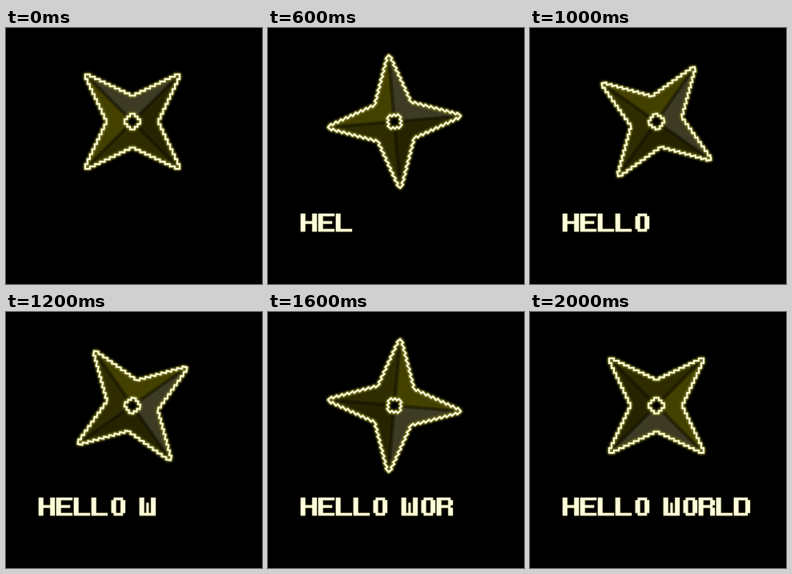
These frames come from a looping animation (320 px wide and 320 px high, 2.2 s). An HTML page with a canvas:

```html
<!DOCTYPE html>
<html lang="en">
<head>
<meta charset="utf-8">
<title>Hello world</title>
<style>
  html, body { margin: 0; height: 100%; overflow: hidden; background: #000; }
  canvas { display: block; }
</style>
</head>
<body>
<canvas id="stage" width="320" height="320" role="img" aria-label="HELLO WORLD"></canvas>
<script>
const ctx = document.getElementById('stage').getContext('2d');
const STEP = 200, STEPS = 11;
const MESSAGE = 'HELLO WORLD';
const CREAM = '#ffffdc', GLOW = '#7c7a2c';
const CELL = 2.95;
const FACETS = ['#3d3b24', '#262400', '#2e2c00', '#434000'];  // top, right, bottom, left

// Repeats one side of a shape in all four directions.
function fourSided(side) {
  const path = new Path2D();
  for (let turn = 0; turn < 4; turn++) {
    side.forEach(([x, y], i) => turn || i ? path.lineTo(x, y) : path.moveTo(x, y));
    side = side.map(([x, y]) => [-y, x]);
  }
  path.closePath();
  return path;
}

// A staircase from the blunt tip down to the notch, then its mirror image.
function starSide() {
  const half = [[-20, -20]];
  for (let i = 0; i < 9; i++) {
    const x = -18 + 2.1 * i;
    half.push([x, -20 + i], [x, -19 + i]);
  }
  return half.concat(half.map(([x, y]) => [-x, y]).reverse());
}

const star = fourSided(starSide());
const hole = fourSided([[-1, -3.3], [1, -3.3], [1, -2.2], [2.2, -2.2], [2.2, -1]]);

function outline(path) {
  ctx.strokeStyle = GLOW;
  ctx.lineWidth = 1.3;
  ctx.stroke(path);
  ctx.strokeStyle = CREAM;
  ctx.lineWidth = 0.7;
  ctx.stroke(path);
}

function drawStar(degrees) {
  ctx.save();
  ctx.translate(158, 117);
  ctx.rotate(degrees * Math.PI / 180);
  ctx.scale(CELL, CELL);
  ctx.lineJoin = 'round';

  ctx.save();
  ctx.clip(star);
  for (const color of FACETS) {
    ctx.fillStyle = color;
    ctx.beginPath();
    ctx.moveTo(0, 0);
    ctx.lineTo(-21, -21);
    ctx.lineTo(21, -21);
    ctx.fill();
    ctx.rotate(Math.PI / 2);
  }
  ctx.strokeStyle = 'rgba(15, 14, 0, 0.45)';
  ctx.lineWidth = 1.6;
  ctx.beginPath();
  for (const side of [-1, 1]) {
    ctx.moveTo(-20, -20 * side);
    ctx.lineTo(20, 20 * side);
  }
  ctx.stroke();
  ctx.restore();

  ctx.fillStyle = '#000';
  ctx.fill(hole);
  ctx.shadowColor = GLOW;
  ctx.shadowBlur = 3;
  outline(star);
  outline(hole);
  ctx.restore();
}

// Builds a letter from stems and bars on a grid of seven by seven cells.
function drawLetter(letter, x) {
  const isOneOf = letters => letters.includes(letter);
  const w = 2.9, h = 3.2, top = 232;
  const stem = (col, from, to, width = 2) =>
    ctx.rect(x + col * w, top + from * h, width * w, (to - from) * h);
  const barEnd = isOneOf('ORD') ? 6 : 7;
  const bar = (row, end = barEnd) => ctx.rect(x + 2 * w, top + row * h, (end - 2) * w, h);

  ctx.beginPath();
  if (isOneOf('O')) stem(1, 1, 6);
  else stem(0, 0, 7);
  if (isOneOf('HW')) stem(5, 0, 7);
  if (isOneOf('OD')) stem(5, 1, 6);
  if (isOneOf('R')) {
    stem(5, 1, 3);
    stem(5, 4, 7);
  }
  if (isOneOf('W')) stem(3, 2, 6, 1);
  if (isOneOf('EORD')) bar(0);
  if (isOneOf('HER')) bar(3, 6);
  if (isOneOf('ELOWD')) bar(6);
  ctx.fill();
}

function drawText(count) {
  ctx.save();
  ctx.fillStyle = CREAM;
  ctx.shadowColor = GLOW;
  ctx.shadowBlur = 2;
  let x = 40.8;
  for (const letter of MESSAGE.slice(0, count)) {
    if (letter !== ' ') drawLetter(letter, x);
    x += letter === ' ' ? 16 : 22;
  }
  ctx.restore();
}

function frame() {
  const step = Math.floor(performance.now() / STEP) % STEPS;
  ctx.fillStyle = '#000';
  ctx.fillRect(0, 0, 320, 320);
  drawStar(20 * Math.max(0, step - 1));
  drawText(step > 5 ? step + 1 : step);  // the space takes no time to type
  requestAnimationFrame(frame);
}
frame();
</script>
</body>
</html>
```
